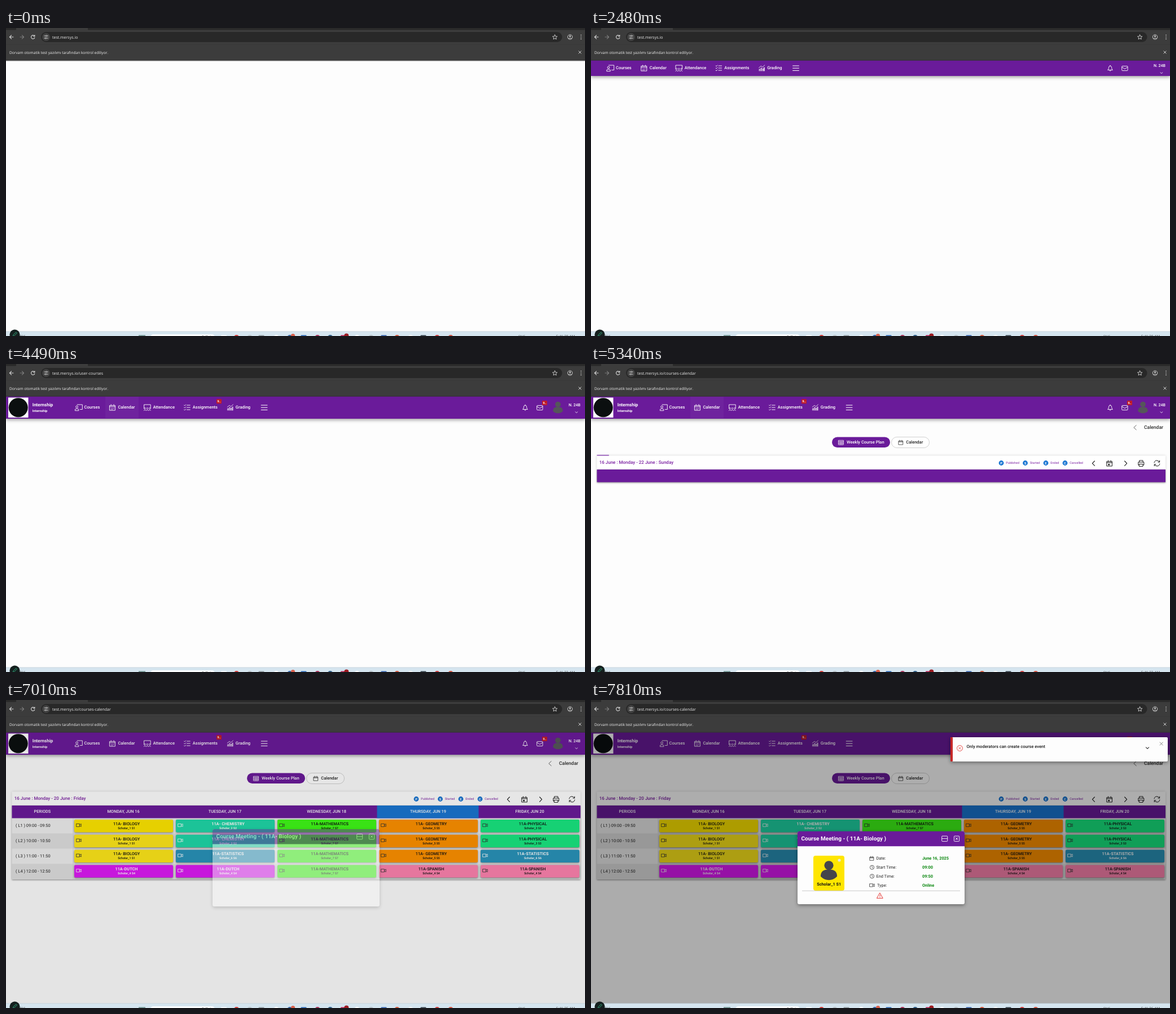
Recreate the animation shown at these times as an HTML page. Size 1026 by 546 pixels, loop 8000 ms.

```html
<!DOCTYPE html>
<html lang="en">
<head>
<meta charset="utf-8">
<title>Course calendar</title>
<style>
html, body { margin: 0; width: 100%; height: 100%; overflow: hidden; background: #fdfdfd; }
svg { display: block; width: 100vw; height: 100vh; }
text { font-family: Roboto, sans-serif; text-rendering: geometricPrecision; white-space: pre; }
.ui { font-family: "Open Sans", "Noto Sans", sans-serif; }
.low { filter: drop-shadow(0 1px 1.5px rgba(0,0,0,.45)); }
.mid { filter: drop-shadow(0 2px 3px rgba(0,0,0,.4)); }
.soft { filter: drop-shadow(0 0 2px rgba(0,0,0,.16)); }
</style>
</head>
<body>
<svg id="stage" viewBox="0 0 1026 546" xmlns="http://www.w3.org/2000/svg"></svg>
<script>
const LOOP = 8000;
const PURPLE = '#6a1b9a', INK = '#1c1c1c';

// Markup helpers
const rect = (x, y, w, h, fill, rx = 0, more = '') =>
  `<rect x="${x}" y="${y}" width="${w}" height="${h}" fill="${fill}" rx="${rx}" ${more}/>`;
const disc = (x, y, r, fill, more = '') => `<circle cx="${x}" cy="${y}" r="${r}" fill="${fill}" ${more}/>`;
const line = (d, color, w = 1, more = '') =>
  `<path d="${d}" fill="none" stroke="${color}" stroke-width="${w}" stroke-linecap="round" stroke-linejoin="round" ${more}/>`;
const ring = (x, y, r, color, w = 1) => disc(x, y, r, 'none', `stroke="${color}" stroke-width="${w}"`);
const text = (x, y, s, size, fill = INK, weight = 500, anchor = 'start', more = '') =>
  `<text x="${x}" y="${y}" font-size="${size}" fill="${fill}" font-weight="${weight}" text-anchor="${anchor}" ${more}>${s}</text>`;
const group = (id, body, more = '') => `<g ${id ? `id="${id}"` : ''} ${more}>${body}</g>`;
const cross = (x, y, r, color, w) => line(`M${x - r} ${y - r}l${2 * r} ${2 * r}M${x + r} ${y - r}l${-2 * r} ${2 * r}`, color, w);

// Icons
const camera = (x, y, color) =>
  line(`M${x - 4} ${y - 2.6}h5.4v5.2h-5.4zM${x + 1.4} ${y - .8}l2.8-1.6v4.8l-2.8-1.6`, color, .8);
const calIcon = (x, y, r, color, w = 1) =>
  line(`M${x - r} ${y - r + 1}h${2 * r}v${2 * r - 1}h${-2 * r}zM${x - r} ${y - r / 3}h${2 * r}M${x - r / 2} ${y - r - .7}v2M${x + r / 2} ${y - r - .7}v2`, color, w);
const clockIcon = (x, y, color) => ring(x, y, 3.6, color, .8) + line(`M${x} ${y - 2}v2.2l1.6.8`, color, .7);

function browser() {
  const c = '#d6d6d6';
  return rect(0, 0, 1026, 57.5, '#3c3c3c') + rect(0, 0, 18, 3.5, '#292929', 1) +
    rect(145, 0, 881, 3.5, '#292929', 1) + rect(0, 29, 1026, .6, '#383838') + rect(0, 56.6, 1026, .9, '#303030') +
    line('M13 16H6.5M9.6 12.8L6.4 16l3.2 3.2', c, 1.1) + line('M25 16h6.5M28.4 12.8l3.2 3.2-3.2 3.2', '#7c7c7c', 1.1) +
    line('M50.4 14.3A3.2 3.2 0 1 0 50.8 17M50.9 12.6v2.2h-2.3', c, 1.1) +
    rect(62, 7, 923.5, 18, '#282828', 9) + disc(71, 16, 7, '#424242') +
    line('M67.8 14h2.4M73 14h1.4M67.8 18h1.2M71.8 18h2.6', c, .9) + ring(71.6, 14, 1.1, c, .8) + ring(70.4, 18, 1.1, c, .8) +
    text(82, 18.7, '', 7, '#ededed', 400, 'start', 'id="url" class="ui"') +
    line('M972.6 12l1.2 2.8 3 .2-2.3 2 .7 3-2.6-1.6-2.6 1.6.7-3-2.3-2 3-.2z', c, .9) +
    ring(999.5, 16, 4.2, c, .9) + disc(999.5, 14.7, 1.4, c) + line('M996.8 18.6q2.7-2 5.4 0', c, .9) +
    [12.6, 16, 19.4].map(y => disc(1019, y, .8, c)).join('') +
    text(6, 45.6, 'Dorvam otomatik test yazılımı tarafından kontrol ediliyor.', 6.6, '#f2f2f2', 400, 'start', 'class="ui"') +
    cross(1017, 43, 2.2, '#e0e0e0', .9);
}

function taskbar() {
  const apps = [[386, '#fff'], [408.5, '#d33a36'], [432, '#b9c2c8'], [452.5, '#8d979d'], [479, '#fff'], [503, '#3465a8'],
    [527.5, '#2463b4'], [552, '#a83058'], [574.5, '#2d5c86'], [598, '#b81d55'], [622, '#fff'], [647, '#b5bfc6'],
    [669.5, '#2f5dab'], [693, '#d2573c'], [717, '#f6f6f6'], [739.5, '#36424c'], [764, '#ce3b3b'], [788, '#d4523f']];
  return rect(0, 538, 1026, 8, '#d5e5ef') + rect(0, 537.6, 1026, .7, '#bccbd5') +
    text(24, 549, 'TSC', 6, '#333', 400, 'start', 'class="ui"') +
    disc(15.5, 543.5, 9, '#15201f') + line('M12.4 546l.8-2.4 4.6-4.4 1.6 1.6-4.6 4.6z', '#35b184', .9) +
    rect(235, 544.4, 12, 4, '#6f9391') + rect(256, 543, 114, 12, '#fbfdfe', 5) +
    text(347, 550, '5 (3x)', 6.5, '#333', 400, 'start', 'class="ui"') +
    apps.map(([x, c], i) => i % 3 ? disc(x, 549, 5, c) : rect(x - 5, 544.6, 10, 5, c, 1)).join('') +
    disc(508.5, 545.5, 3.6, '#d9604c') + disc(603.3, 545.5, 4, '#9c1c22') +
    text(908, 549, 'ENG', 6, '#333', 400, 'start', 'class="ui"') +
    text(1008, 549, '', 6.4, '#333', 400, 'end', 'id="clock" class="ui"');
}

function menu() {
  const w = '#fff';
  const items = [[44, 'Courses'], [103.8, 'Calendar'], [165.8, 'Attendance'], [236.2, 'Assignments'], [312.2, 'Grading']];
  return items.map(([x, s]) => text(x, 73.3, s, 7.5, w)).join('') +
    line('M31.5 66h9.2v8.5h-4M27.8 76.3v-2q3.2-2.6 6.4 0v2z', w, .9) + ring(31, 70, 1.9, w, .9) +
    calIcon(94, 71.3, 4.8, w, .9) + line('M91.6 72.7h.6M93.8 72.7h.6M96 72.7h.6M91.6 74.7h.6M93.8 74.7h.6', w, .8) +
    line('M150 73v-7h11.6v7', w, .9) + [151.6, 155.8, 160].map(x => ring(x, 72.6, 1.2, w, .7) + line(`M${x - 1.7} 76.6q1.7-3.4 3.4 0`, w, .8)).join('') +
    line('M221 67l1 1 2-2M221 71l1 1 2-2M221 75l1 1 2-2M226 67h5.6M226 71h5.6M226 75h5.6', w, .9) +
    line('M298 76v-3h1.6v3M301 76v-5h1.6v5M304 76v-3.6h1.6v3.6M306.4 76v-6h1v6M297.6 70.4l3.6-3 2.8 2 3.8-3.6', w, .8) +
    line('M357.6 67h10.8M357.6 71.2h10.8M357.6 75.4h10.8', w, 1);
}

function account() {
  const w = '#fff';
  return line('M916 74.2q1.4-1.2 1.3-3.4 0-3.4 2.7-3.6 2.7.2 2.7 3.6-.1 2.2 1.3 3.4zM919 75.8q1 1 2 0M920 66.2v.8', w, .9) +
    rect(940.7, 67.6, 10.3, 8, 'none', 1, 'stroke="#fff" stroke-width=".9"') + line('M941 69.5l4.9 3 4.9-3', w, .9) +
    text(1018, 69.3, 'N. 24B', 7, w, 500, 'end') + line('M1008.9 78.8l2 1.8 2-1.8', w, .8);
}

const badge = (x, y) => rect(x, y, 9, 8, '#c01c28', 1) + text(x + 4.5, y + 6, '9..', 5.4, '#fff', 700, 'middle');
const person = (x, y, k, color) => group('', disc(0, -6, 5, color) +
  `<path d="M-9 6Q-9-1-2-1.4H2Q9-1 9 6Q5 10 0 10T-9 6Z" fill="${color}"/>`, `transform="translate(${x} ${y}) scale(${k})"`);

function nav() {
  return rect(0, 57, 1026, 28, PURPLE, 0, 'id="bar" class="mid"') +
    group('hover', rect(176, 58, 59, 38, '#fff', 0, 'opacity=".035"')) +
    disc(212, 77, 17, '#fff', 'id="ripple"') +
    group('menu', menu()) + group('account', account()) +
    group('brand', rect(4, 59.5, 35.5, 35.5, '#fff') + disc(21.7, 77.2, 17, '#0b0f10') +
      text(46.8, 74.8, 'Internship', 8, '#fff', 700) + text(46.8, 84.6, 'Internship', 5.8, '#fff', 700) + person(978, 77.5, .98, '#55565a')) +
    group('badges', badge(373, 62.3) + badge(950, 65));
}

function planner() {
  const legend = [[727, 'P', 'Published'], [769.5, 'S', 'Started'], [806, 'E', 'Ended'], [840, 'C', 'Cancelled']];
  return line('M966.2 108.6l-4.4 4 4.4 4', '#555', .9) + text(1014, 114.8, 'Calendar', 8.5, '#2b2b2b', 500, 'end') +
    rect(427, 129.5, 103, 18.5, PURPLE, 9.2) +
    line('M438.8 135.4h8.6v7.6h-8.6zM438.8 137.6h8.6M438.8 140.3h8.6M441.6 137.6v5.4M444.6 137.6v5.4', '#fff', .8) +
    text(453, 141.3, 'Weekly Course Plan', 7.5, '#fff') +
    rect(532.5, 129.5, 67, 19, '#fff', 9.5, 'stroke="#c4c4c4" stroke-width=".8"') + calIcon(549, 139.3, 3.7, '#333', .8) +
    text(558.3, 141.3, 'Calendar', 7.5, '#222') +
    rect(10.5, 162.5, 1007.5, 25, '#fff', 0, 'class="soft"') +
    text(14.7, 177, '', 8, '#7b1fa2', 500, 'start', 'id="week"') +
    legend.map(([x, k, s]) => disc(x, 175.5, 4.4, '#1976d2') + text(x, 177.6, k, 5.8, '#fff', 700, 'middle') +
      text(x + 8.3, 177.4, s, 5.4, '#7b1fa2', 400)).join('') +
    line('M892.4 172l-4 4.2 4 4.2M945.6 172l4 4.2-4 4.2', INK, 1.1) + calIcon(918.8, 176.4, 4.6, INK, 1) + rect(916.3, 177, 2.8, 2.6, INK) +
    line('M971.6 174v-3h6.4v3M971.4 179h-1.6v-5h10v5h-1.6M971.6 177.4h6.4v4h-6.4z', INK, 1) +
    line('M998 175q.6-4 4.8-4 3 0 4.6 2.8M1007.6 171.2v2.8h-2.8M1007.8 177q-.6 4-4.8 4-3 0-4.6-2.8M998.2 180.8v-2.8h2.8', INK, 1);
}

// Subject: colour, light text, teacher number
const SUBJECTS = {
  '- BIOLOGY': ['#ffe81a', 0, 1], '- CHEMISTRY': ['#1fd8a8', 1, 2], '-MATHEMATICS': ['#3ffb17', 0, 7],
  '- GEOMETRY': ['#ff9100', 0, 5], '-PHYSICAL': ['#18e880', 0, 3], '-STATISTICS': ['#2993ba', 1, 6],
  '-DUTCH': ['#dc19f4', 1, 4], '-SPANISH': ['#ff83af', 0, 4]
};
const [BIO, CHEM, MATH, GEO, PHYS, STAT, DUTCH, SPAN] = Object.keys(SUBJECTS);
const DAYS = ['MONDAY', 'TUESDAY', 'WEDNESDAY', 'THURSDAY', 'FRIDAY'];
const ROWS = [[BIO, CHEM, MATH, GEO, PHYS], [BIO, CHEM, MATH, GEO, PHYS], [BIO, STAT, MATH, GEO, STAT], [DUTCH, DUTCH, MATH, SPAN, SPAN]];
const tutor = n => `Scholar_${n} S${n}`;

function lesson(name, col, row) {
  const [color, light, n] = SUBJECTS[name], x = 121 + 180 * col, y = 212 + 26.8 * row;
  const ink = light ? '#fff' : '#111', id = row + col ? '' : 'id="first"';
  return rect(x, y, 175, 22.4, color, 2, `class="low" ${id}`) + camera(x + 8, y + 10, light ? '#fff' : '#333') +
    text(x + 92.5, y + 9.8, '11A' + name, 7.3, ink, light ? 700 : 500, 'middle') +
    text(x + 92.5, y + 16.8, tutor(n), 5.25, ink, light ? 700 : 500, 'middle');
}

function table() {
  let s = rect(10.5, 187, 1007.5, 131, '#eee', 0, 'class="low"');
  ROWS.forEach((r, i) => s += rect(10.5, 209.5 + 27 * i, 1007.5, 27.2, i % 2 ? '#e0e0e0' : '#eeeeee'));
  s += rect(118.6, 209.5, .7, 108.5, '#cfcfcf') + rect(10.5, 187, 1007.5, 22.5, PURPLE) + rect(657.5, 187, 180, 22.5, '#1976d2') +
    text(64.4, 200.3, 'PERIODS', 7.35, '#fff', 500, 'middle');
  DAYS.forEach((d, i) => s += text(208 + 180 * i, 200.3, `${d}, JUN ${16 + i}`, 7.35, '#fff', 500, 'middle'));
  ROWS.forEach((r, i) => {
    const h = String(9 + i).padStart(2, '0');
    s += text(17, 225.2 + 26.9 * i, `( L${i + 1} ) ${h}:00 - ${h}:50`, 7.45, '#222', 400);
    r.forEach((name, j) => s += lesson(name, j, i));
  });
  return s;
}

function dialog() {
  const info = [['Date:', 'June 16, 2025'], ['Start Time:', '09:00'], ['End Time:', '09:50'], ['Type:', 'Online']];
  const head = `<path d="M366 255.5v-23.5q0-3 3-3h290q3 0 3 3v23.5z" fill="${PURPLE}"/>` +
    text(372.5, 245.3, 'Course Meeting - ( 11A- Biology )', 10, '#fff', 600) +
    rect(621.7, 237.5, 10, 9.4, 'none', 1, 'stroke="#fff" stroke-width=".9"') + line('M622 242h9.6', '#fff', .9) +
    rect(643.4, 237.5, 9.2, 9.4, 'none', 1, 'stroke="#fff" stroke-width=".9"') + cross(648, 242.2, 1.8, '#fff', 1);
  const body = rect(394, 276, 55, 62, '#ffe600', 4) + person(421.5, 303, 1.62, '#45454b') + disc(440, 284, 2.6, '#e9e9d8') +
    text(421.7, 329.4, tutor(1), 7.3, '#111', 600, 'middle') + rect(374, 337.8, 280, .8, '#bdbdbd') +
    line('M512 342.2l5.2 9.2h-10.4z', '#e53935', 1) + line('M512 345.6v2.6M512 349.8v.1', '#e53935', 1) +
    info.map(([k, v], i) => text(i == 3 ? 507 : 505.5, 283.4 + 15.9 * i, k, 7.35, '#222', 400) + text(587, 283.4 + 15.9 * i, v, 7.35, '#0a870f', 700)).join('') +
    calIcon(497.5, 281, 3.3, '#333', .8) + clockIcon(498, 296.7, '#333') + clockIcon(498, 312.4, '#333') + camera(498, 328.4, '#333');
  return rect(366, 229, 296, 137, '#fdfdfd', 3, 'id="sheet" class="mid"') + group('head', head) +
    group('spin', line('M4.6-6.3A7.8 7.8 0 0 1 7.8 0', '#7b1fa2', 1.3)) + group('details', body);
}

function toast() {
  return rect(637, 66, 385, 43, '#fdfdfd', 2, 'class="mid"') + rect(637, 66, 4, 43, '#c62828', 1) +
    ring(653.5, 85.5, 5, '#e53935', .9) + cross(653.5, 85.5, 1.7, '#e53935', .9) +
    text(665.5, 85, 'Only moderators can create course event', 7.6, '#1a1a1a') +
    line('M983.4 83.8l2.6 2.6 2.6-2.6', '#333', 1.1) + cross(1010.7, 77.5, 2.6, '#777', .9);
}

document.getElementById('stage').innerHTML =
  rect(0, 0, 1026, 546, '#fdfdfd') + rect(0, 57.5, 1026, 1.3, '#a9a9a9') +
  group('card', rect(390, 115, 247, 368, '#fff', 3, 'class="soft"')) +
  group('plan', planner()) +
  group('strip', rect(10.5, 187, 1007.5, 22.5, PURPLE, 0, 'class="low"')) +
  rect(10.5, 161, 18, 1.5, '#8e4bb5', 0, 'id="load"') +
  group('table', table()) + group('nav', nav()) +
  rect(0, 57, 1026, 482, '#000', 0, 'id="dim"') +
  group('dialog', dialog()) + group('toast', toast()) + browser() + taskbar();

// id: start, end, fade in, fade out, peak opacity
const SHOW = {
  card: [200, 1210, 70, 300, .5], nav: [2480, LOOP], brand: [2810, LOOP], badges: [3340, LOOP],
  hover: [3810, 5800], ripple: [4010, 4350, 0, 200, .06],
  plan: [4680, LOOP, 0], strip: [5340, 5810], load: [5340, 5660, 0, 80], table: [5540, LOOP, 200],
  dim: [7010, LOOP, 100, 0, .32], dialog: [7010, LOOP, 70], spin: [7060, 7410], details: [7410, LOOP, 120],
  toast: [7480, LOOP, 200]
};
const URLS = [[4680, '/courses-calendar'], [3810, '/user-courses'], [0, '']];

const el = {};
document.querySelectorAll('[id]').forEach(n => el[n.id] = n);
const clamp = v => Math.max(0, Math.min(1, v));
const attr = (id, k, v) => el[id].setAttribute(k, v);
const label = (id, s) => { if (el[id].textContent !== s) el[id].textContent = s; };

function draw(t) {
  for (const id in SHOW) {
    const [a, b, fin = 0, fout = 0, peak = 1] = SHOW[id];
    let o = t >= a && t < b ? peak : 0;
    if (fin) o *= clamp((t - a + 30) / fin);
    if (fout) o *= clamp((b - t) / fout);
    el[id].style.opacity = o;
    el[id].style.display = o ? '' : 'none';
  }
  label('url', 'test.mersys.io' + URLS.find(u => t >= u[0])[1]);
  label('clock', `5:41:${28 + Math.floor((t + 190) / 1000)} AM`);
  label('week', `16 June : Monday - ${t < 5540 ? '22 June : Sunday' : '20 June : Friday'}`);

  const wide = t >= 2810;
  attr('bar', 'height', wide ? 40 : 28);
  attr('menu', 'transform', wide ? 'translate(94.6 6)' : '');
  attr('account', 'transform', wide ? 'translate(0 6)' : '');
  attr('ripple', 'r', 17 + 13 * clamp((t - 4010) / 340));
  attr('load', 'width', 18 + 989 * clamp((t - 5340) / 300));
  attr('first', 'fill', t < 6210 ? '#ffe81a' : '#ffe600');

  const ready = t >= 7410;
  attr('sheet', 'y', ready ? 233 : 229);
  attr('sheet', 'height', ready ? 129 : 137);
  attr('head', 'transform', ready ? 'translate(0 3.7)' : '');
  attr('spin', 'transform', `translate(512.4 307.5) rotate(${(t - 7090) * .5})`);
}

const start = performance.now();
function tick() {
  draw((performance.now() - start) % LOOP);
  requestAnimationFrame(tick);
}
tick();
</script>
</body>
</html>
```
